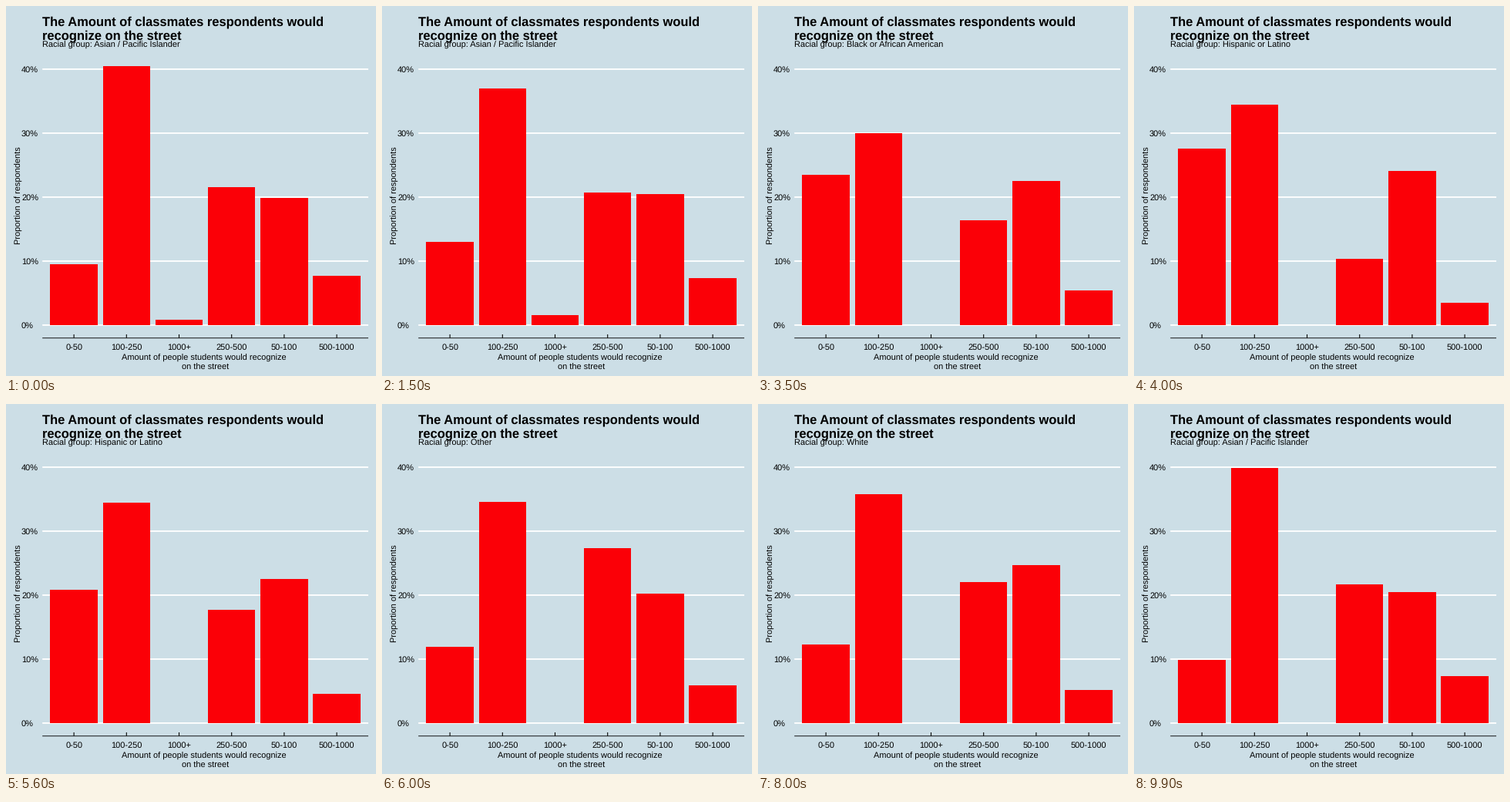
Animation of 480 by 480 pixels, one loop 10000 ms. Source, as a matplotlib script:

```python
import numpy as np
import matplotlib.pyplot as plt
from matplotlib.animation import FuncAnimation
from matplotlib.patches import Rectangle

SIZE, DPI = 480, 96
PT = 72 / DPI                      # points per pixel
FRAMES, INTERVAL = 100, 100
STATE_FRAMES, STEPS = 20, 7        # frames per group, tween steps at its end

LEFT, RIGHT, AXIS_Y = 47.2, 470, 430.75
BASE, SCALE = 413.92, 830          # zero line and pixels per unit proportion
UNIT = (RIGHT - LEFT) / 6.2        # six categories, 0.6 padding each side

ANSWERS = ["0-50", "100-250", "1000+", "250-500", "50-100", "500-1000"]
COUNTS = {
    "Asian / Pacific Islander": [11, 47, 1, 25, 23, 9],
    "Black or African American": [7, 9, 1, 6, 7, 2],
    "Hispanic or Latino": [8, 10, 0, 3, 7, 1],
    "Other": [10, 29, 0, 23, 17, 5],
    "White": [19, 55, 0, 34, 38, 8],
}
GROUPS = list(COUNTS)
SHARES = [np.array(c) / sum(c) for c in COUNTS.values()]

plt.rcParams.update({
    "font.family": "Liberation Sans",
    "text.hinting": "none",
    "text.hinting_factor": 8,
})

fig = plt.figure(figsize=(SIZE / DPI, SIZE / DPI), dpi=DPI, facecolor="#ccdee6")
ax = fig.add_axes([0, 0, 1, 1])
ax.set_xlim(0, SIZE)
ax.set_ylim(SIZE, 0)
ax.axis("off")


def label(x, y, text, ha="center", size=11, **kw):
    return ax.text(x, y, text, ha=ha, va="baseline", fontsize=size * PT,
                   color="black", rotation_mode="anchor", **kw)


def line(xs, ys, color, width):
    ax.plot(xs, ys, color=color, lw=width * PT, solid_capstyle="butt",
            snap=False, zorder=1)


def center(i):
    return LEFT + UNIT * (i + 0.6)


for k in range(5):
    y = BASE - k * SCALE / 10
    line([LEFT, RIGHT], [y, y], "white", 1.87)
    label(20, y + 4, f"{k * 10}%", "left")

line([LEFT, RIGHT], [AXIS_Y, AXIS_Y], "black", 0.9)
bars = []
for i, answer in enumerate(ANSWERS):
    x = center(i)
    line([x, x], [426, AXIS_Y], "black", 1.07)
    label(x, 446, answer)
    x0, x1 = round(x - 0.45 * UNIT), round(x + 0.45 * UNIT)
    bar = Rectangle((x0, round(BASE)), x1 - x0, 0, fc="#fb0007", lw=0,
                    snap=False, zorder=2)
    bars.append(ax.add_patch(bar))

label(47, 25, "The Amount of classmates respondents would", "left", 16.53, weight="bold")
label(47, 43, "recognize on the street", "left", 16.53, weight="bold")
subtitle = label(47, 54, "", "left", 11.03)
label(257.1, 460, "Amount of people students would recognize")
label(258.6, 472, "on the street")
label(20, 245.3, "Proportion of respondents", rotation=90)


def update(frame):
    state, step = divmod(frame, STATE_FRAMES)
    after = (state + 1) % len(GROUPS)
    t = max(0, step - (STATE_FRAMES - STEPS)) / STEPS
    start, end = SHARES[state], SHARES[after]
    shares = start + (end - start) * t
    if t > 0:
        # bars missing from either group are hidden during the change
        shares = np.where((start > 0) & (end > 0), shares, 0)
    for bar, share in zip(bars, shares):
        top = round(BASE - SCALE * share)
        bar.set_y(top)
        bar.set_height(round(BASE) - top)
        bar.set_visible(share > 0)
    subtitle.set_text("Racial group: " + GROUPS[after if t > 0.5 else state])
    return [*bars, subtitle]


anim = FuncAnimation(fig, update, frames=FRAMES, interval=INTERVAL,
                     repeat=True, repeat_delay=0, blit=False)
plt.show()
```
